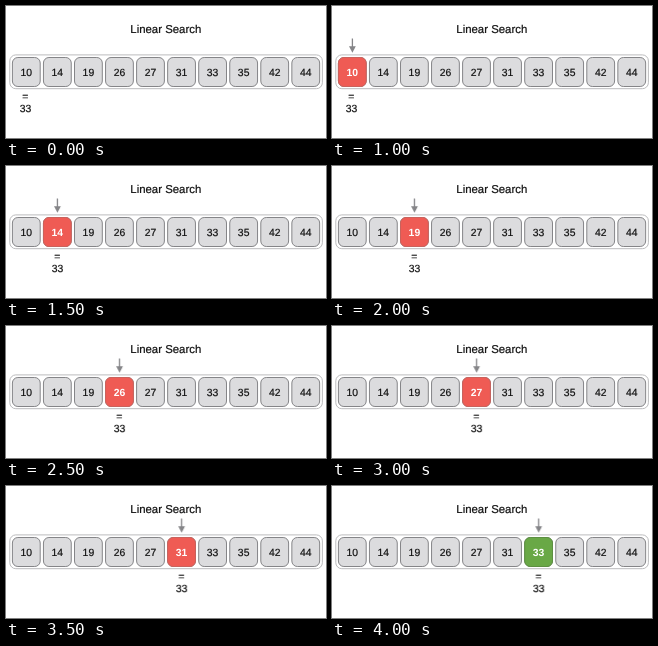
An HTML page for the animation above (5.5 s loop, 320x132 px).

```html
<!DOCTYPE html>
<html lang="en">
<head>
<meta charset="utf-8">
<title>Linear Search</title>
<style>
html, body { margin: 0; width: 100%; height: 100%; overflow: hidden; background: #fff; }
svg { display: block; width: 100%; height: 100%; }
text {
  font: 10.4px "Liberation Sans", Arial, sans-serif;
  text-anchor: middle;
  text-rendering: geometricPrecision;
  fill: #111;
  stroke: #111;
  stroke-width: .2;
}
.title { font-size: 11.4px; }
.tray { fill: #fff; stroke: #b4b4b6; stroke-width: .9; }
.cell rect { fill: #dcdcde; stroke: #858588; }
.hit { opacity: 0; animation: visit 5.5s step-end calc(1s + var(--i) * .5s) infinite; }
.hit rect { fill: #ef5b54; stroke: #c9625c; }
.hit text { fill: #fff; stroke: none; font-weight: bold; }
.hit.match { animation-name: found; }
.hit.match rect { fill: #69a846; stroke: #5d8f42; }
.probe { animation: walk 5.5s step-end infinite; }
.arrow { stroke: #858588; fill: #858588; animation: appear 5.5s step-end infinite; }
.key { animation: nudge 5.5s step-end infinite; }

@keyframes visit { 0% { opacity: 1; } 9.09%, 100% { opacity: 0; } }
@keyframes found { 0% { opacity: 1; } 27.27%, 100% { opacity: 0; } }
@keyframes appear { 0% { opacity: 0; } 18.18%, 100% { opacity: 1; } }
@keyframes nudge { 0% { transform: translateX(-.9px); } 27.27%, 100% { transform: none; } }
@keyframes walk {
  0% { transform: translateX(0); }
  27.27% { transform: translateX(31.05px); }
  36.36% { transform: translateX(62.1px); }
  45.45% { transform: translateX(93.15px); }
  54.54% { transform: translateX(124.2px); }
  63.63% { transform: translateX(155.25px); }
  72.72%, 100% { transform: translateX(186.3px); }
}
</style>
</head>
<body>
<svg viewBox="0 0 320 132">
  <text class="title" x="159.8" y="27">Linear Search</text>
  <rect class="tray" x="3.8" y="48.9" width="312.6" height="33.8" rx="6"/>
  <g id="cells"></g>
  <g class="probe">
    <g class="arrow">
      <path d="M20.4 32.5V42" fill="none" stroke-width="1.3"/>
      <path d="M17 40.2H23.8L20.4 46.8Z" stroke="none"/>
    </g>
    <g class="key">
      <text x="20.2" y="94.3">=</text>
      <text x="20.4" y="106.3">33</text>
    </g>
  </g>
</svg>
<script>
const values = [10, 14, 19, 26, 27, 31, 33, 35, 42, 44];
const goal = values.indexOf(33);

const box = (value, i, kind) => {
  const x = 20.3 + 31.05 * i;
  return `<g class="${kind}" style="--i:${i}">
    <rect x="${x - 13.9}" y="51.5" width="27.8" height="29" rx="5.5"/>
    <text x="${x}" y="69.6">${value}</text></g>`;
};

document.getElementById("cells").innerHTML = values.map((value, i) =>
  box(value, i, "cell") +
  (i <= goal ? box(value, i, i === goal ? "hit match" : "hit") : "")
).join("");
</script>
</body>
</html>
```
